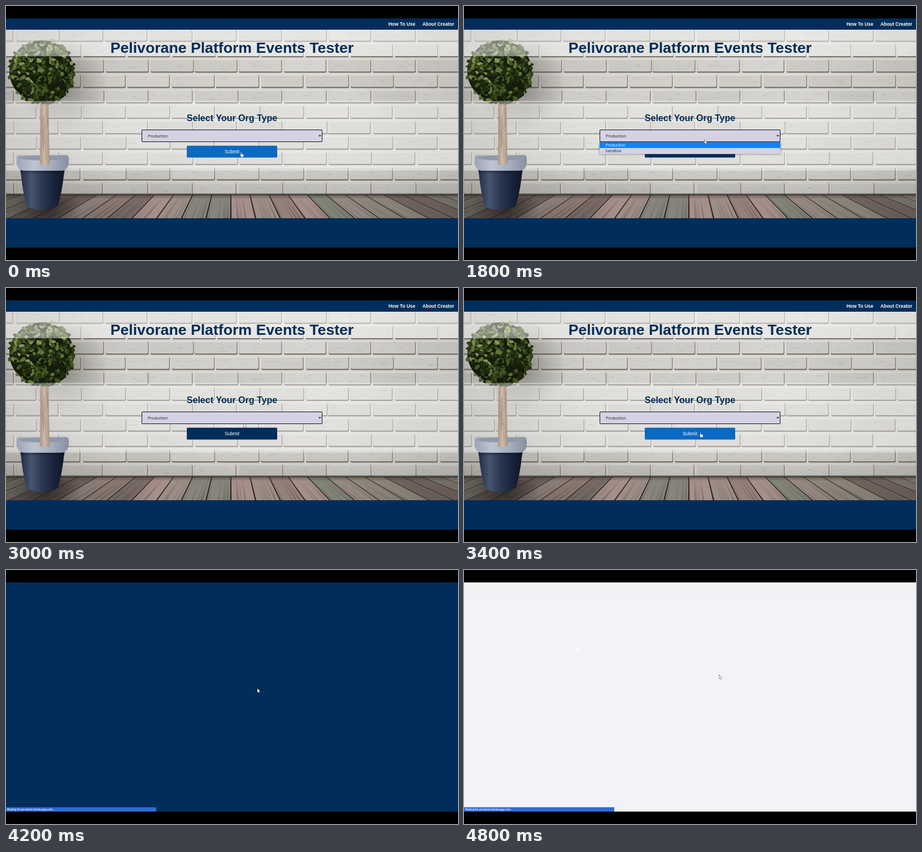
Animation, 800 px wide and 450 px high, one loop 5 s. Source, as an HTML page with a canvas:

```html
<!DOCTYPE html>
<html lang="en">
<head>
<meta charset="utf-8">
<title>Platform Events Tester</title>
<style>
  html, body { margin: 0; width: 100%; height: 100%; overflow: hidden; background: #000; }
  canvas { display: block; width: 800px; height: 450px; }
</style>
</head>
<body>
<canvas id="stage" width="800" height="450"></canvas>
<script>
const NAVY = '#002d5a', HOVER = '#0b69c1';
const SANS = '"Liberation Sans", Arial, sans-serif';
const UI = '"Open Sans", "Noto Sans", sans-serif';
const LOOP = 5000, STEP = 200;

let g;
let seed = 7;
const rnd = () => (seed = (seed * 16807) % 2147483647) / 2147483647;
const pick = list => list[Math.floor(rnd() * list.length)];

function rect(x, y, w, h, fill) {
  g.fillStyle = fill;
  g.fillRect(x, y, w, h);
}

function box(x, y, w, h, r, fill) {
  g.beginPath();
  g.roundRect(x, y, w, h, r);
  g.fillStyle = fill;
  g.fill();
}

function poly(points, fill) {
  g.beginPath();
  points.forEach(([x, y]) => g.lineTo(x, y));
  g.closePath();
  g.fillStyle = fill;
  g.fill();
}

function oval(x, y, rx, ry, turn, fill) {
  g.beginPath();
  g.ellipse(x, y, rx, ry, turn, 0, 7);
  g.fillStyle = fill;
  g.fill();
}

function text(str, x, y, font, fill, align = 'left') {
  g.font = font;
  g.fillStyle = fill;
  g.textAlign = align;
  g.fillText(str, x, y);
}

function shade(gradient, ...colors) {
  colors.forEach((c, i) => gradient.addColorStop(i / (colors.length - 1), c));
  return gradient;
}
const across = (x0, x1, ...c) => shade(g.createLinearGradient(x0, 0, x1, 0), ...c);
const down = (y0, y1, ...c) => shade(g.createLinearGradient(0, y0, 0, y1), ...c);
const glow = (x, y, r, ...c) => shade(g.createRadialGradient(x, y, 0, x, y, r), ...c);

function wall() {
  rect(0, 42, 800, 294, '#dad8d3');
  for (let row = 0; row < 11; row++) {
    const y = 40.1 + row * 27.3;
    for (let x = (row % 2 ? 214 : 175) - 237; x < 800; x += 79) {
      const left = x + rnd() * 2, w = 76.5 - rnd() * 2, v = 204 + rnd() * 10;
      box(left, y + .5, w, 23, 2, '#77736b');
      box(left, y, w - 1.2, 21.3, 2, `rgb(${v},${v - 1},${v - 6})`);
      rect(left + 2, y, w - 5, 1, '#e6e5e0');
      for (let i = 0; i < 6; i++)
        oval(left + 6 + rnd() * 62, y + 4 + rnd() * 13, 2 + rnd() * 5, 1, 0, 'rgba(150,147,138,.13)');
    }
  }
  rect(0, 42, 800, 294, across(0, 800, 'rgba(70,66,58,.22)', 'rgba(70,66,58,.04)', 'rgba(70,66,58,0)', 'rgba(70,66,58,0)', 'rgba(70,66,58,.1)'));
  rect(0, 285, 800, 51, down(285, 336, 'rgba(60,55,48,0)', 'rgba(60,55,48,.15)'));
  rect(20, 42, 180, 220, glow(100, 138, 80, 'rgba(45,42,36,.4)', 'rgba(45,42,36,.18)', 'rgba(45,42,36,0)'));
}

function floor() {
  const tones = ['#94817a', '#a58f8b', '#87847b', '#979083', '#7c6e68', '#9c8d87', '#84867a'];
  rect(0, 334, 800, 42, '#29221f');
  const top = x => 398 + (x - 398) * .77;
  for (let x = -130; x < 930; x += 44) {
    poly([[top(x) + .8, 335], [top(x + 44) - .8, 335], [x + 42.8, 377], [x + 1.2, 377]], pick(tones));
    for (let i = 0; i < 6; i++) {
      const s = x + 4 + rnd() * 36;
      poly([[top(s), 337], [s - .8, 377], [s + .8, 377]], 'rgba(45,34,28,.25)');
    }
  }
  rect(0, 332, 800, 10, down(332, 342, 'rgba(35,30,26,.55)', 'rgba(35,30,26,0)'));
  rect(0, 334, 800, 42, across(0, 800, 'rgba(30,24,20,.35)', 'rgba(30,24,20,0)', 'rgba(30,24,20,0)', 'rgba(30,24,20,.2)'));
}

function pot() {
  rect(0, 340, 160, 36, glow(72, 358, 62, 'rgba(20,16,14,.6)', 'rgba(20,16,14,.3)', 'rgba(20,16,14,0)'));
  g.beginPath();
  g.moveTo(25, 283);
  g.quadraticCurveTo(29, 330, 37, 355);
  g.quadraticCurveTo(64, 369, 91, 355);
  g.quadraticCurveTo(100, 330, 104, 283);
  g.fillStyle = across(25, 104, '#202b43', '#48556f', '#2b3752', '#1a243c', '#0d1526');
  g.fill();
  rect(25, 290, 79, 8, down(290, 298, 'rgba(8,12,24,.5)', 'rgba(8,12,24,0)'));
  box(19, 264, 92, 28, [5, 5, 14, 14], across(19, 111, '#66748f', '#9aa5ba', '#76839c', '#46536e'));
  oval(65, 269, 42, 4.5, 0, '#56617a');
}

function plant() {
  pot();
  poly([[61, 160], [75, 160], [77, 281], [60, 281]], across(60, 77, '#806249', '#b59778', '#745740'));
  for (let i = 0; i < 14; i++)
    rect(61 + rnd() * 13, 168 + rnd() * 75, 1, 18 + rnd() * 20, 'rgba(60,38,22,.4)');

  oval(63, 116, 57, 55, 0, '#151d0c');
  const greens = ['#131b0a', '#1f2a10', '#2f3d18', '#445522', '#62723a', '#87955c'];
  for (let i = 0; i < 430; i++) {
    const a = rnd() * 6.283, r = Math.sqrt(rnd());
    const x = 63 + r * 58 * Math.cos(a), y = 116 + r * 57 * Math.sin(a);
    const light = rnd() * 5.4 - (y - 116) / 50 - (x - 63) / 120;
    oval(x, y, 3 + rnd() * 3, 1.8 + rnd() * 1.6, rnd() * 3.14,
      greens[Math.max(0, Math.min(5, Math.floor(light)))]);
  }
}

function drawPage() {
  rect(0, 22, 800, 406, NAVY);
  g.save();
  g.beginPath();
  g.rect(0, 42, 800, 334);
  g.clip();
  wall();
  floor();
  plant();
  rect(0, 42, 800, 47, 'rgba(255,255,255,.45)');
  rect(0, 168, 800, 123.5, 'rgba(255,255,255,.35)');
  g.restore();
  text('How To Use', 677, 35, 'bold 8.4px ' + SANS, '#fff');
  text('About Creator', 737, 35, 'bold 8.4px ' + SANS, '#fff');
  text('Pelivorane Platform Events Tester', 400, 82.5, 'bold 26.67px ' + SANS, NAVY, 'center');
  text('Select Your Org Type', 400, 203.7, 'bold 16px ' + SANS, NAVY, 'center');
}

function form(open, hover) {
  box(320, 247.5, 160, 21, 1.5, hover ? HOVER : NAVY);
  text('Submit', 400, 260.8, '8.4px ' + SANS, '#fff', 'center');
  box(240, 219, 320, 22, 2, '#101018');
  box(241, 220, 318, 20, 1, '#d4d2e3');
  text('Production', 251, 232.8, '7px ' + UI, '#1c1c20');
  g.beginPath();
  [[553.7, 228.6], [555.5, 230.6], [557.3, 228.6]].forEach(p => g.lineTo(...p));
  g.strokeStyle = '#111';
  g.lineWidth = 1.1;
  g.stroke();
  if (!open) return;
  g.save();
  g.shadowColor = 'rgba(0,0,0,.5)';
  g.shadowBlur = 3;
  g.shadowOffsetY = 1;
  rect(240, 241, 320, 21.3, '#d4d2e3');
  g.restore();
  rect(240, 241.2, 320, 10.4, '#0f82fb');
  text('Production', 250.3, 248.9, '7px ' + UI, '#fff');
  text('Sandbox', 250.3, 259.3, '7px ' + UI, '#1c1c20');
}

const ARROW = 'M0 0V6.8L1.5 5.4 2.5 7.8 3.6 7.3 2.6 5H4.7Z';
const HAND = 'M1 .6Q1.7 0 2.2 .7V3.2L5.6 4Q6.3 4.3 6.1 5.2L5.5 8.4H2L-.2 5.6Q-.1 4.6 1 5.2Z';

function cursor(x, y, hand) {
  const shape = new Path2D(hand ? HAND : ARROW);
  g.save();
  g.translate(x, y);
  g.strokeStyle = '#222';
  g.lineWidth = .9;
  g.stroke(shape);
  g.fillStyle = '#fff';
  g.fill(shape);
  g.restore();
}

// time, x, y of the pointer tip
const track = [
  [0, 414.5, 259], [200, 416, 257], [600, 422, 236], [800, 425, 226], [1200, 425, 226],
  [2000, 426, 241], [2200, 426, 247], [2400, 426, 247], [3000, 421, 240], [3400, 417, 256],
  [3800, 417, 256], [4000, 434.5, 229.5], [4200, 445, 210], [4400, 451.5, 191],
  [4600, 451.5, 185.5], [5000, 451.5, 185.5]
];

function tip(t) {
  const i = track.findIndex(k => k[0] > t);
  const [t0, x0, y0] = track[i - 1], [t1, x1, y1] = track[i];
  const p = (t - t0) / (t1 - t0);
  return [x0 + (x1 - x0) * p, y0 + (y1 - y0) * p];
}

function draw(t) {
  rect(0, 0, 800, 450, '#000');
  if (t < 4200) {
    g.drawImage(page, 0, 0);
    form(t >= 1000 && t < 2400, t < 600 || t >= 3400);
  } else if (t < 4800) {
    rect(0, 22, 800, 406, NAVY);
    if (t >= 4600) rect(200.5, 141.3, 1.3, 1.3, '#dce4ec');
  } else {
    rect(0, 22, 800, 406, '#f2f2f9');
    rect(0, 22, 800, 20, '#f2f2f3');
    oval(201, 142, 2.5, 2, 0, '#fff');
  }
  if (t >= 4000) {
    rect(0, 420.3, 266, 7.7, '#2b6dd5');
    text('Waiting for pe-tester.herokuapp.com...', 2, 426.4, '600 4.5px ' + UI, '#fff');
  }
  cursor(...tip(t), t < 600 || (t >= 3400 && t < 4000));
}

const page = document.createElement('canvas');
page.width = 800;
page.height = 450;
g = page.getContext('2d');
drawPage();
g = document.getElementById('stage').getContext('2d');

const start = performance.now();
function tick() {
  const t = (performance.now() - start) % LOOP;
  draw(Math.floor(t / STEP) * STEP);
  requestAnimationFrame(tick);
}
tick();
</script>
</body>
</html>
```
